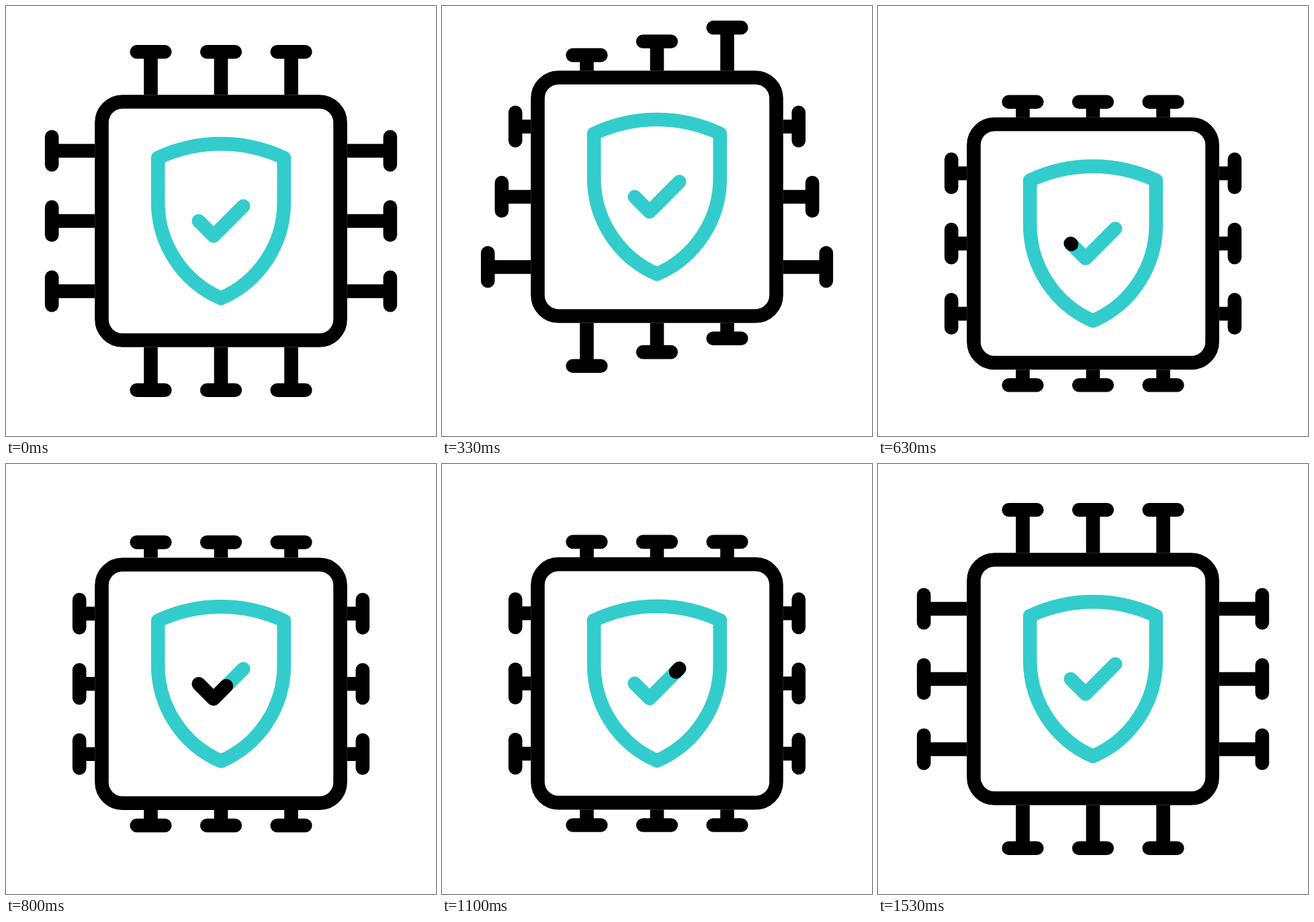
Animation, 640 px wide and 640 px high, one loop 1.67 s. Source, as an HTML page with a canvas:

```html
<!DOCTYPE html>
<html lang="en">
<head>
<meta charset="utf-8">
<title>Secure chip</title>
<style>
  html, body { margin: 0; width: 100%; height: 100%; overflow: hidden; background: #fff; }
  canvas { display: block; width: 640px; height: 640px; }
</style>
</head>
<body>
<canvas id="stage" width="640" height="640"></canvas>
<script>
const ctx = document.getElementById('stage').getContext('2d');
const LOOP = 1670, STROKE = 20.6, RETRACT = 41, TEAL = '#33cccc';

// All shapes are centred on the origin; keyframe times are in 1/30 s.
const bounce = [[0, 0], [10.4, -36.2], [11.8, -36.2], [19.9, 36], [28, -20.5], [35.3, 15], [41.9, 0]];
const pins = [
  { x: -104.5, keys: [[3.78, 0], [10.03, 1], [35.97, 1], [42.2, 0]] },
  { x: 0,      keys: [[6.86, 0], [13.11, 1], [37.88, 1], [44.1, 0]] },
  { x: 104.5,  keys: [[9.94, 0], [16.19, 1], [39.8, 1], [46, 0]] }
];
const sweepHead = [[18.2, 0], [28.2, 1]];
const sweepTail = [[24.7, 0], [34.7, 1]];

const body = new Path2D();
body.roundRect(-177.5, -177.5, 355, 355, 30.9);
const shield = new Path2D(
  'M-93.8-94A221 221 0 0 1 93.8-94V-28A155.8 155.8 0 0 1 0 115A155.8 155.8 0 0 1-93.8-28Z');
const check = new Path2D('M-33.2 0L-11.1 22.2L33.2-22.3');
const CHECK_LENGTH = Math.hypot(22.1, 22.2) + Math.hypot(44.3, 44.5);

// Eased value of a keyframe track at time f.
function track(keys, f) {
  if (f <= keys[0][0]) return keys[0][1];
  for (let i = 1; i < keys.length; i++) {
    const [t0, v0] = keys[i - 1], [t1, v1] = keys[i];
    if (f < t1) {
      const u = (f - t0) / (t1 - t0);
      return v0 + (v1 - v0) * u * u * (3 - 2 * u);
    }
  }
  return keys[keys.length - 1][1];
}

function stroke(path, color = '#000', cap = 'round') {
  ctx.strokeStyle = color;
  ctx.lineCap = cap;
  ctx.stroke(path);
}

function drawPins(f) {
  for (const { x, keys } of pins) {
    const y = -251.8 + RETRACT * track(keys, f);
    stroke(new Path2D(`M${x} ${y}V-187.7`), '#000', 'butt');
    stroke(new Path2D(`M${x - 20.8} ${y}h41.6`));
  }
}

function draw(f) {
  ctx.setTransform(1, 0, 0, 1, 0, 0);
  ctx.fillStyle = '#fff';
  ctx.fillRect(0, 0, 640, 640);
  ctx.lineWidth = STROKE;
  ctx.lineJoin = 'round';
  ctx.translate(320, 320 + track(bounce, f));

  // Top, bottom, right, and left as the mirror of right.
  for (const [turns, flip] of [[0, 1], [2, 1], [1, 1], [1, -1]]) {
    ctx.save();
    ctx.scale(flip, 1);
    ctx.rotate(turns * Math.PI / 2);
    drawPins(f);
    ctx.restore();
  }
  stroke(body);
  stroke(shield, TEAL);
  stroke(check, TEAL);

  const tail = track(sweepTail, f) * CHECK_LENGTH;
  const head = track(sweepHead, f) * CHECK_LENGTH;
  if (head > tail) {
    ctx.setLineDash([head - tail, 2 * CHECK_LENGTH]);
    ctx.lineDashOffset = -tail;
    stroke(check);
    ctx.setLineDash([]);
  }
}

// Steps at 30 per second, on whole hundredths of a second.
function tick() {
  const hundredths = Math.floor(performance.now() % LOOP / 10);
  draw(Math.floor((hundredths + 0.4) * 0.3));
  requestAnimationFrame(tick);
}
tick();
</script>
</body>
</html>
```
